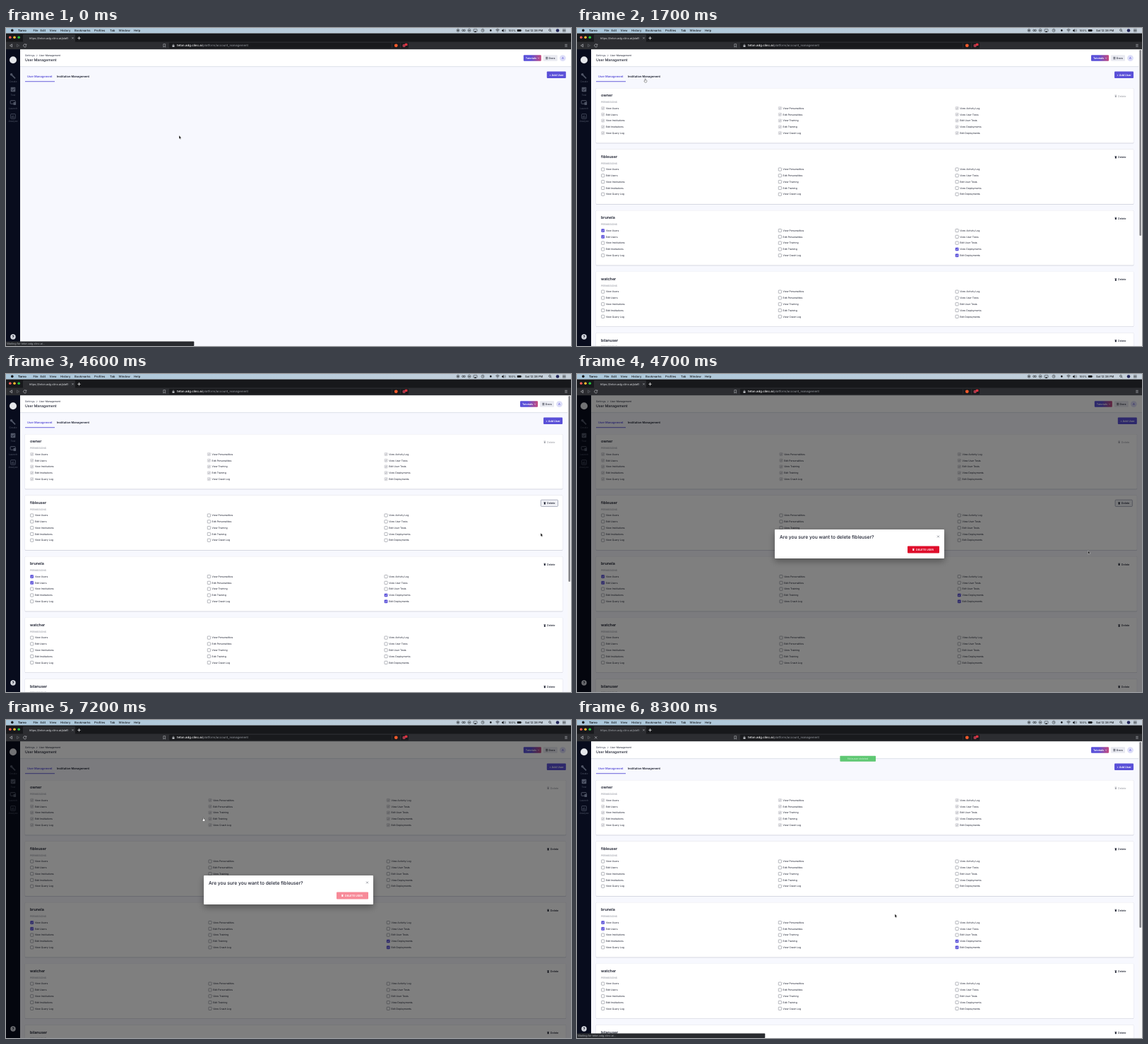
An HTML page for the animation above (8400 ms loop, 800 by 450 pixels).

```html
<!DOCTYPE html>
<html lang="en">
<head>
<meta charset="utf-8">
<title>User Management</title>
<style>
  html, body { margin: 0; width: 100%; height: 100%; overflow: hidden; background: #f7f8fe; }
  svg { display: block; width: 100vw; height: 100vh; }
  text { font-family: Inter, Roboto, sans-serif; text-rendering: geometricPrecision; white-space: pre; }
</style>
</head>
<body>
<svg viewBox="0 0 800 450">
  <defs>
    <linearGradient id="menu"><stop stop-color="#a9c6da"/><stop offset="1" stop-color="#c6d0da"/></linearGradient>
    <linearGradient id="tutorial"><stop offset=".4" stop-color="#5a50d8"/><stop offset="1" stop-color="#c4497c"/></linearGradient>
    <filter id="shadow" x="-20%" y="-40%" width="140%" height="200%">
      <feDropShadow dx="0" dy="4" stdDeviation="5" flood-opacity=".35"/>
    </filter>
  </defs>
  <g id="scene"></g>
  <g id="arrow"><path d="M0 0V4.8L1.1 3.9 1.8 5.4 2.6 5 1.9 3.6H3.4Z" fill="#111" stroke="#fff" stroke-width=".35"/></g>
  <g id="hand"><path d="M-.5.4Q0-.3.5.4V2L2.3 2.6V4.2L1.6 5.4H-.6L-1.8 3.3-1.2 2.9-.5 3.4Z" fill="#fff" stroke="#222" stroke-width=".4"/></g>
</svg>
<script>
const LOOP = 8400, STEP = 100;
const PURPLE = '#5a50d8', INK = '#171b2b';
const scene = document.getElementById('scene');
const arrow = document.getElementById('arrow');
const hand = document.getElementById('hand');

const rect = (x, y, w, h, fill, r = 0, extra = '') =>
  `<rect x="${x}" y="${y}" width="${w}" height="${h}" rx="${r}" fill="${fill}" ${extra}/>`;
const circle = (x, y, r, fill, extra = '') => `<circle cx="${x}" cy="${y}" r="${r}" fill="${fill}" ${extra}/>`;
const line = (d, color, width = .6) =>
  `<path d="${d}" fill="none" stroke="${color}" stroke-width="${width}"/>`;
// y is the middle of the capitals
const text = (x, y, size, str, fill = INK, weight = 400, anchor = 'start') =>
  `<text x="${x}" y="${y + size * .36}" font-size="${size}" fill="${fill}" font-weight="${weight}" text-anchor="${anchor}">${str}</text>`;
const cross = (x, y, r, color, width = .6) =>
  line(`M${x - r} ${y - r}l${2 * r} ${2 * r}M${x + r} ${y - r}l${-2 * r} ${2 * r}`, color, width);
const trash = (x, y, color) =>
  rect(x - 1, y - .8, 2, 2.5, color, .3) + rect(x - 1.4, y - 1.6, 2.8, .6, color);

function menuBar() {
  const items = { File: 38.5, Edit: 48.5, View: 61.5, History: 77, Bookmarks: 97, Profiles: 125, Tab: 147, Window: 159.5, Help: 181 };
  const c = '#15181d';
  return rect(0, 0, 800, 7.5, 'url(#menu)') + circle(8.8, 3.4, 1.8, c) +
    text(17, 3.5, 4.2, 'Tarvo', c, 700) +
    Object.entries(items).map(([name, x]) => text(x, 3.5, 4.2, name, c, 500)).join('') +
    circle(640, 3.4, 1.9, 'none', `stroke="${c}" stroke-width=".5"`) + circle(640, 3.4, .9, c) +
    circle(646.8, 3.4, 1.2, 'none', `stroke="${c}" stroke-width=".6"`) +
    circle(649.2, 3.4, 1.2, 'none', `stroke="${c}" stroke-width=".6"`) +
    circle(656, 3.4, 2, 'none', `stroke="${c}" stroke-width=".5"`) + rect(654.8, 3, 2.4, .8, c) +
    rect(662, 1.8, 5, 3.2, 'none', .4, `stroke="${c}" stroke-width=".5"`) + `<path d="M663 6l1.5-2 1.5 2z" fill="${c}"/>` +
    circle(675, 3.4, 2, 'none', `stroke="${c}" stroke-width=".5"`) + line('M675 2.2v1.4h1', c, .5) +
    circle(686.3, 3.4, 1.3, c) +
    line('M693.5 2.6q2.5-2 5 0M694.4 3.8q1.6-1.3 3.2 0', c, .7) + circle(696, 5, .6, c) +
    `<path d="M702 2.7h1l1.6-1.4v4.4L703 4.4h-1z" fill="${c}"/>` + line('M705.6 2.2q1 1.3 0 2.6M706.7 1.5q1.6 2 0 4', c, .4) +
    text(711.5, 3.5, 3.8, '100%', c, 500) +
    rect(723.8, 2, 5.6, 3, c, .6) + rect(729.8, 3, .5, 1, c) +
    text(735, 3.5, 4.05, 'Sat 12:38 PM', c, 500) +
    circle(770, 3, 1.4, 'none', `stroke="${c}" stroke-width=".6"`) + line('M771 4l1.3 1.4', c) +
    circle(781, 3.5, 2.3, '#23265a') +
    line('M788 2h4.6M788 3.5h4.6M788 5h4.6', c, .6);
}

function browser(loading) {
  const c = '#c9ccd0', dim = '#686c72';
  return rect(0, 7.5, 800, 12.5, '#17181b') + rect(24, 9, 74, 11, '#2c2d31', 1) + rect(0, 19.5, 800, 10.7, '#2c2d31') +
    ['#ff5f57', '#febc2e', '#28c840'].map((f, i) => circle(5.8 + 6.2 * i, 13.3, 1.8, f)).join('') +
    text(33, 14.3, 3.95, 'https://teton.adg.clinc.ai/platf', loading ? '#a5a8ad' : '#dddfe2') +
    text(86.5, 14.3, 3.95, 'o', dim) +
    cross(94.5, 14.3, 1.2, c, .5) + line('M101.3 14.3h4.4M103.5 12.1v4.4', '#fff', .7) +
    line('M8.6 22.8L5.4 24.8 8.6 26.8Z', c) + line('M15.4 22.8L18.6 24.8 15.4 26.8Z', dim) +
    (loading ? cross(26.7, 24.8, 1.6, c) : line('M28.5 23.7A2.1 2.1 0 1 0 28.8 25.4M28.9 22.5v1.6h-1.6', c)) +
    line('M222.8 22.7h2.8v4.4l-1.4-1.2-1.4 1.2z', c, .5) +
    rect(231, 20.8, 339, 8, '#191a1d', 1) +
    rect(235.5, 24.4, 3, 2.4, c, .3) + line('M236.1 24.5v-.9q.9-1.6 1.8 0v.9', c, .5) +
    text(242, 24.9, 4.35, 'teton.adg.clinc.ai', '#fff', 500) +
    text(277.8, 24.9, 4.32, '/platform/account_management', '#9a9da3') +
    rect(546.5, 21.5, .4, 6.8, '#47494e') + circle(552.3, 24.8, 2.4, '#f2592a') +
    rect(558.2, 21.5, .4, 6.8, '#47494e') + circle(563.6, 25, 2.2, '#a63a4c') + rect(564.8, 21.7, 3.6, 3.4, '#e5323e', .7) +
    line('M791.3 23.3h3.4M791.3 24.8h3.4M791.3 26.3h3.4', c, .5);
}

function sidebar() {
  const c = '#4f5566';
  const labels = ['Create', 'Test', 'Launch', 'Analyze'];
  return rect(0, 30, 20, 420, '#080c1d') + circle(10, 45.2, 5, '#e4e6ea') +
    line('M7.2 65.4l5.8 6', c, 1.7) + circle(7.6, 65.8, 1.8, c) +
    rect(6.7, 83.7, 6.6, 6.6, c, .8) + line('M8.2 87l1.4 1.4 2.4-2.8', '#080c1d', .8) +
    rect(6.2, 102.7, 7, 4.6, 'none', .6, `stroke="${c}"`) + rect(10.5, 105, 3.6, 4, c, .4) +
    rect(6.7, 121.7, 6.6, 6.6, 'none', .6, `stroke="${c}" stroke-width=".8"`) + line('M8.5 127v-2M10 127v-3.5M11.5 127v-1.5', c, .8) +
    labels.map((s, i) => text(10, 75.7 + 18.8 * i, 3.5, s, c, 400, 'middle')).join('') +
    circle(10, 437, 3.7, '#d5d8df') + text(10, 437, 5.5, '?', '#080c1d', 700, 'middle');
}

function header(shift) {
  const at = x => x + shift;
  return rect(20, 30, 780, 24, '#fff') + rect(20, 54, 780, .7, '#d5d6df') + rect(20, 54.7, 780, .7, '#eceef5') +
    text(27, 39, 3.5, 'Settings', '#30364a') + line('M43.2 37.9l1.1 1.1-1.1 1.1', '#30364a', .5) +
    text(47, 39, 3.45, 'User Management') + text(27, 45.2, 5.05, 'User Management', INK, 500) +
    rect(at(728), 38.2, 25, 8.6, 'url(#tutorial)', 1) + text(at(731), 42.6, 3.6, 'Tutorials', '#fff', 600) +
    line(`M${at(748)} 42l1.2 1.2 1.2-1.2`, '#fff', .5) +
    rect(at(756), 38.2, 20, 8.6, '#e9eaf1', 1) +
    line(`M${at(759.4)} 41.3h3M${at(759.4)} 42.6h3M${at(759.4)} 43.9h3`, INK, .6) +
    text(at(763.8), 42.6, 3.6, 'Docs', INK, 500) +
    circle(at(783.5), 42.6, 4.4, '#dddef8') + text(at(783.5), 42.6, 4, 'A', PURPLE, 500, 'middle') +
    text(30, 69, 4, 'User Management', PURPLE, 600) + text(72, 69, 4.03, 'Institution Management', INK, 600) +
    rect(27, 75.3, 42, .9, PURPLE) +
    rect(at(761), 61.5, 27, 9.6, PURPLE, 1) + text(at(774.5), 66.3, 3.75, '+ Add User', '#fff', 600, 'middle');
}

function checkbox(x, y, checked, disabled) {
  const fill = disabled ? '#e6e6e9' : checked ? PURPLE : '#fff';
  const edge = disabled ? '#c2c3c8' : checked ? PURPLE : '#6d717d';
  return rect(x, y - 2.1, 4.2, 4.2, fill, .6, `stroke="${edge}" stroke-width=".5"`) +
    (checked ? line(`M${x + 1} ${y}l.9 1 1.5-2`, disabled ? '#9b9da5' : '#fff', .6) : '');
}

const PERMISSIONS = [
  ['View Users', 'Edit Users', 'View Institutions', 'Edit Institutions', 'View Query Log'],
  ['View Personalities', 'Edit Personalities', 'View Training', 'Edit Training', 'View Crash Log'],
  ['View Activity Log', 'View User Tests', 'Edit User Tests', 'View Deployments', 'Edit Deployments']
];
const USERS = [
  { name: 'owner', locked: true },
  { name: 'fibleuser' },
  { name: 'brunela', granted: ['View Users', 'Edit Users', 'View Deployments', 'Edit Deployments'] },
  { name: 'watcher' },
  { name: 'bilanuser' }
];

function card({ name, locked = false, granted = [] }, index, shift, focused) {
  const top = 85 + 86.55 * index, right = 788 + shift, pitch = (right - 36) / 3;
  const color = locked ? '#a5a7ae' : INK;
  let out = rect(26.7, top, right - 26.4, 78.4, '#d6d8e2', 1.2) + rect(27, top + .2, right - 27, 77.3, '#fff', 1) +
    text(34, top + 10.4, 5.4, name, INK, 600) + text(34, top + 20, 3.4, 'PERMISSIONS', '#858994');
  if (focused) out += rect(right - 30.7, top + 6.6, 24.2, 9.3, '#f0f1f6', 1, 'stroke="#8d92a6" stroke-width=".7"');
  out += trash(right - 25.2, top + 11.3, color) + text(right - 22, top + 11.3, 3.75, 'Delete', color, 500);
  PERMISSIONS.forEach((column, c) => column.forEach((label, r) => {
    const x = 34.6 + pitch * c, y = top + 28.5 + 8.8 * r;
    out += checkbox(x, y, locked || granted.includes(label), locked) + text(x + 6.3, y, 3.45, label);
  }));
  return out;
}

function dialog(pending) {
  return rect(0, 30, 800, 420, 'rgba(0,0,0,.5)') + rect(280, 220, 240, 41, '#fff', 1, 'filter="url(#shadow)"') +
    text(287, 230.5, 6.65, 'Are you sure you want to delete fibleuser?', INK, 500) +
    cross(511.5, 230, 1.4, '#777b86', .7) +
    rect(468, 243.5, 45, 10, pending ? '#f78a98' : '#df0d2b', 1) +
    trash(476.3, 248.4, '#fff') + text(480, 248.4, 3.75, 'DELETE USER', '#fff', 600);
}

function draw(s) {
  const shift = s.loaded && !s.modal ? 0 : 4.8;
  scene.innerHTML = rect(0, 0, 800, 450, '#f7f8fe') + header(shift) +
    (s.loaded ? USERS.map((u, i) => card(u, i, shift, s.focused && i === 1)).join('') : '') +
    (shift ? '' : rect(795.2, 30, 4.8, 420, '#f8f8f9') + rect(796.4, 31, 2.6, 263, '#85868a', 1.3)) +
    sidebar() + (s.modal ? dialog(s.pending) : '') + menuBar() + browser(s.loading) +
    (s.toast ? rect(372.4, 50.8, 50.6, 8, '#5fc873', .8) + text(397.7, 54.8, 3.7, 'fibleuser deleted', '#c5efcc', 400, 'middle') : '') +
    (s.waiting ? rect(0, 443.6, 266.3, 6.4, '#292b2f', .8) + text(1.3, 447, 3.75, 'Waiting for teton.adg.clinc.ai...', '#adb0b5') : '');
}

// time, x, y of the pointer tip
const PATH = [
  [0, 245, 152], [900, 245, 152], [1600, 96.5, 71.5], [1900, 97, 72], [2700, 735, 164], [3000, 768, 183],
  [3500, 770, 185], [4300, 769, 183], [4500, 768, 207], [4600, 757, 225], [4700, 723.5, 250],
  [5400, 497, 250], [5700, 490, 247], [6500, 490, 247], [7200, 279.5, 138], [7300, 273, 141],
  [7700, 300, 165], [8200, 450, 282], [8300, 450, 274.5], [8400, 450, 274.5]
];
const HAND_TIMES = [[1500, 2000], [2900, 4400], [5400, 7300]];

function pointer(t) {
  const i = PATH.findIndex(p => p[0] > t);
  const [t0, x0, y0] = PATH[i - 1], [t1, x1, y1] = PATH[i];
  const k = (t - t0) / (t1 - t0), e = t1 - t0 > 200 ? k * k * (3 - 2 * k) : k;
  return [x0 + (x1 - x0) * e, y0 + (y1 - y0) * e];
}

let shown = '';
function frame(now) {
  const t = Math.floor(now % LOOP / STEP) * STEP;
  const state = {
    loaded: t >= 1000,
    focused: t >= 4300 && t < 6400,
    modal: t >= 4700 && t < 7300,
    pending: t >= 6400,
    toast: t >= 7300,
    loading: t >= 8000,
    waiting: t < 500 || t >= 8000
  };
  const key = JSON.stringify(state);
  if (key !== shown) { draw(state); shown = key; }
  const [x, y] = pointer(t);
  const pointing = HAND_TIMES.some(([a, b]) => t >= a && t < b);
  for (const [shape, on] of [[arrow, !pointing], [hand, pointing]]) {
    shape.setAttribute('transform', `translate(${x} ${y})`);
    shape.setAttribute('visibility', on ? 'visible' : 'hidden');
  }
  requestAnimationFrame(() => frame(performance.now() - start));
}
const start = performance.now();
frame(0);
</script>
</body>
</html>
```
